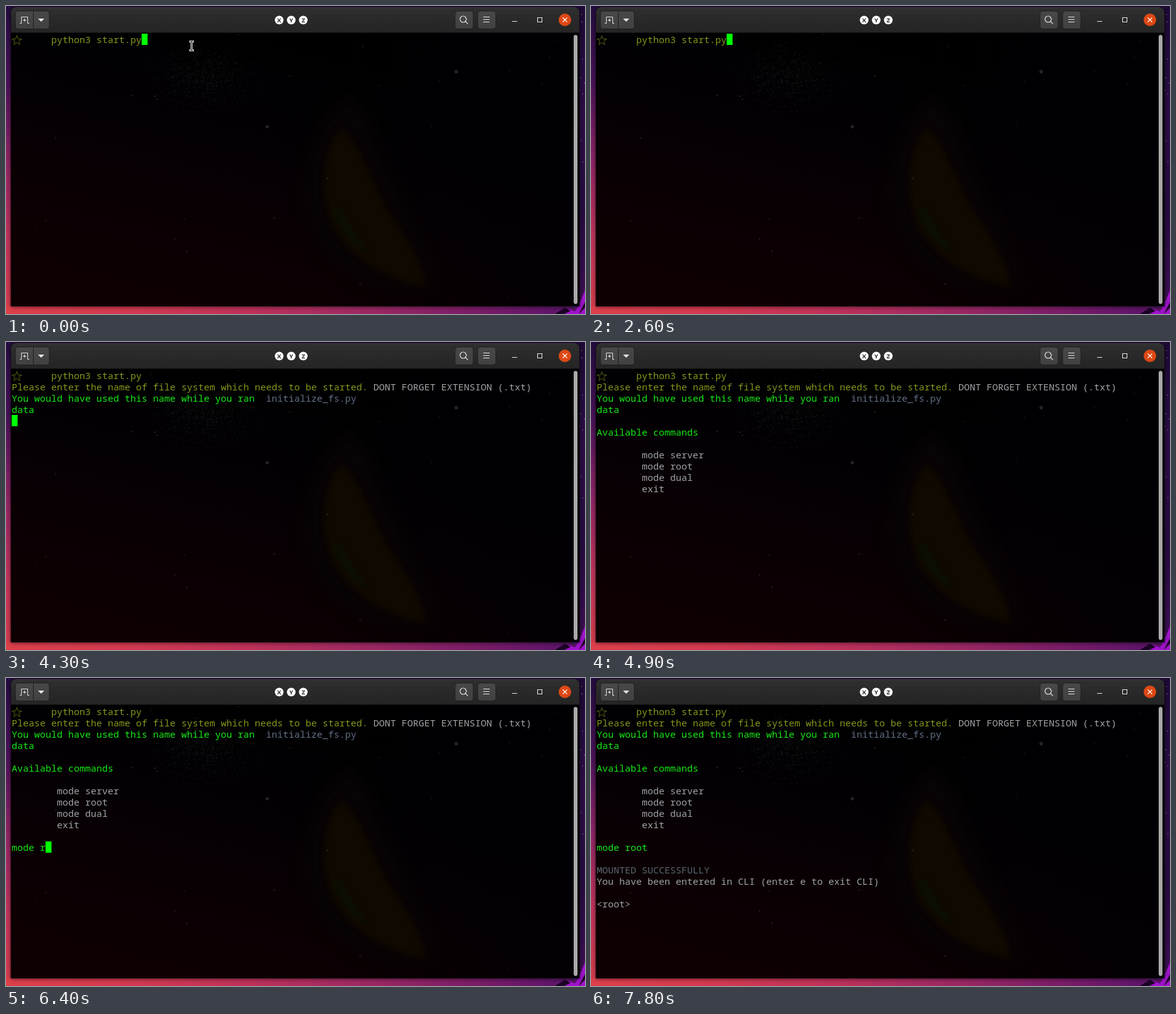
Animation, 922 px wide and 490 px high, one loop 8 s. Source, as an HTML page with a canvas:

```html
<!DOCTYPE html>
<html lang="en">
<head>
<meta charset="utf-8">
<title>Terminal session</title>
<style>
  html, body { margin: 0; width: 100%; height: 100%; overflow: hidden; background: #000; }
  canvas { display: block; }
</style>
</head>
<body>
<canvas id="stage" width="922" height="490"></canvas>
<script>
const W = 922, H = 490, LOOP = 8000, KEY_PACE = 100;
const CELL = 9, ROW = 18, LEFT = 9, TOP = 44;
const OLIVE = '#87961a', GREEN = '#16e816', GREY = '#a0a2a5', SLATE = '#626f86', DIM = '#5a6570';
const FONT = '15px "Noto Sans Mono", "DejaVu Sans Mono", monospace';

const print = (at, colour, text) => ({ at, colour, text });
const type = (at, ...keys) => keys.map((key, i) => print(at + i * KEY_PACE, GREEN, key));

// Everything written to the terminal, in order; the cursor follows the last text.
const SESSION = [
  print(0, OLIVE, '       python3 start.py'),
  print(3000, OLIVE, '\nPlease enter the name of file system which needs to be started. '),
  print(3000, GREY, 'DONT FORGET EXTENSION (.txt)\n'),
  print(3000, GREEN, 'You would have used this name while you ran  '),
  print(3000, SLATE, 'initialize_fs.py\n'),
  ...type(3700, 'da'),
  ...type(3900, 't', 'a'),
  ...type(4300, '\n'),
  print(4500, GREEN, '\nAvailable commands\n\n'),
  ...['mode server', 'mode root', 'mode dual', 'exit\n'].map(name => print(4500, GREY, `        ${name}\n`)),
  ...type(5500, 'm', 'o', 'd'),
  ...type(5900, 'e'),
  ...type(6400, ' r'),
  ...type(6700, 'o', 'o', 't'),
  print(7200, DIM, '\n\nMOUNTED SUCCESSFULLY\n'),
  print(7200, GREY, 'You have been entered in CLI (enter e to exit CLI)\n\n<root> ')
];

// The cursor starts visible and flips at each of these times.
const BLINKS = [400, 1500, 1600, 2200, 3200, 3700, 4900, 5400, 7800];
const POINTER_HIDES = 2600;

const canvas = document.getElementById('stage');
const scene = document.createElement('canvas');
scene.width = W;
scene.height = H;
let c = scene.getContext('2d');

function gradient(x0, y0, x1, y1, colours) {
  const g = c.createLinearGradient(x0, y0, x1, y1);
  colours.forEach((colour, i) => g.addColorStop(i / (colours.length - 1), colour));
  return g;
}

function rect(x, y, w, h, fill) {
  c.fillStyle = fill;
  c.fillRect(x, y, w, h);
}

function rounded(x, y, w, h, r, fill) {
  c.beginPath();
  c.roundRect(x, y, w, h, r);
  c.fillStyle = fill;
  c.fill();
}

function disc(x, y, r, fill) {
  c.beginPath();
  c.arc(x, y, r, 0, Math.PI * 2);
  c.fillStyle = fill;
  c.fill();
}

function shape(path, fill, blur = 0) {
  c.filter = blur ? `blur(${blur}px)` : 'none';
  c.fillStyle = fill;
  c.fill(new Path2D(path));
  c.filter = 'none';
}

function stroke(path, colour, width) {
  c.strokeStyle = colour;
  c.lineWidth = width;
  c.stroke(new Path2D(path));
}

function randomizer(seed) {
  return () => (seed = seed * 16807 % 2147483647) / 2147483647;
}

function drawDesktop() {
  rect(0, 0, W, H, '#200a38');
  rect(0, 0, 9, H, gradient(0, 0, 0, H, ['#250b40', '#4a1259', '#8f2465', '#c0345c', '#d83d4c']));
  rect(912, 0, 10, H, gradient(0, 0, 0, H, ['#1d0935', '#2b0d46', '#260b40', '#400f55']));
  rect(0, 477, W, 13, gradient(0, 0, W, 0, ['#de3f4b', '#d43a50', '#c03258', '#a02a62', '#7c1d66', '#55126a']));
  const random = randomizer(11);
  for (let i = 0; i < 9; i++) disc(914 + random() * 8, random() * 300, 0.8, '#8f6a9c');
  shape('M884 490 L896 482 L906 486 L913 474 L922 452 V490 Z', '#a012cc');
  shape('M874 490 L890 480 L899 485 L889 490 Z M912 490 L922 471 V480 Z', '#1a0424');
}

function drawStars() {
  const random = randomizer(29);
  const scatter = () => random() + random() + random() - 1.5;
  for (let i = 0; i < 1100; i++) {
    rect(312 + scatter() * 70, 112 + scatter() * 50, 1.3, 1.3, `rgba(125,125,125,${0.04 + random() * 0.13})`);
  }
  for (let i = 0; i < 110; i++) {
    disc(8 + random() * 900, 45 + random() ** 1.4 * 430, 0.6 + random() ** 4, 'rgba(120,120,125,0.2)');
  }
  disc(717, 104.5, 3, '#222224');
  disc(416, 192, 2.6, '#262628');
}

function drawWallpaper() {
  c.save();
  c.beginPath();
  c.rect(8, 43, 905, 434);
  c.clip();
  rect(8, 43, 905, 434, gradient(340, 43, 230, 477, ['#000001', '#020003', '#070004', '#0b0003', '#0e0002']));
  rect(500, 43, 413, 434, gradient(500, 0, 913, 0, ['rgba(0,0,3,0)', 'rgba(1,0,5,0.65)']));
  shape('M540 140 C475 200 450 310 505 390 C550 445 635 470 690 446 C672 360 610 270 580 180 Z', '#080304', 10);
  shape('M533 194 C504 230 500 300 520 350 C545 400 610 438 668 446 C664 414 640 372 614 334 C584 290 568 222 533 194 Z', '#100900', 4);
  shape('M517 318 C528 353 548 382 580 394 C562 370 545 345 534 323 Z', '#0b0e01', 3);
  drawStars();
  c.restore();
}

function drawButton(x, w) {
  rounded(x - 0.5, 7.5, w + 1, 29.5, 5, '#1d1d1d');
  rounded(x + 0.5, 8.5, w - 1, 27.5, 4, gradient(0, 8, 0, 36, ['#484848', '#414141']));
}

function drawHeader() {
  rounded(8, 2, 905, 41, [8, 8, 0, 0], gradient(0, 2, 0, 42, ['#303030', '#292929', '#252525']));
  rect(15, 2, 891, 1, '#414141');
  rect(8, 42, 905, 1, '#111');
  drawButton(15, 54);
  rect(43, 9, 1, 27, '#202020');
  drawButton(715, 29);
  drawButton(751, 29);

  const icon = '#e6e6e6';
  stroke('M22 27.5 H24.5 V17.5 H34.5 V27.5 H37 M27 22.5 H32 M29.5 20 V25', icon, 1);
  shape('M51 20 H61 L56 25 Z', icon);
  stroke('M733 21 A5 5 0 1 1 723 21 A5 5 0 1 1 733 21 M731.7 24.7 L735.5 28.5', icon, 1.2);
  stroke('M760 17.5 H770 M760 21.5 H770 M760 25.5 H770', icon, 1.2);
  stroke('M806 24.5 H814 M846.5 18.5 H853.5 V25.5 H846.5 Z', icon, 1.1);
  disc(890, 22, 10, '#dd4814');
  stroke('M886.5 18.5 L893.5 25.5 M893.5 18.5 L886.5 25.5', '#fff', 1.2);

  c.font = 'bold 9.5px "Open Sans", sans-serif';
  c.textAlign = 'center';
  ['X', 'Y', 'Z'].forEach((letter, i) => {
    const x = 435 + i * 19.2;
    disc(x, 22.3, 6.9, '#fff');
    c.fillStyle = '#252525';
    c.fillText(letter, x, 25.7);
  });
}

function drawPromptStar() {
  c.beginPath();
  for (let i = 0; i < 10; i++) {
    const angle = i * Math.PI / 5 - Math.PI / 2, r = i % 2 ? 3.3 : 8;
    c.lineTo(17.3 + r * Math.cos(angle), 55 + r * Math.sin(angle));
  }
  c.closePath();
  c.strokeStyle = '#6c7416';
  c.lineWidth = 0.85;
  c.stroke();
}

function drawPointer() {
  const beam = 'M293.5 56.5 H297.5 M295.5 56.5 V70.5 M293.5 70.5 H297.5';
  c.lineCap = 'square';
  stroke(beam, '#f4f4f4', 3);
  stroke(beam, '#111', 1);
}

function buildScene() {
  drawDesktop();
  c.save();
  c.shadowColor = 'rgba(0,0,0,0.55)';
  c.shadowBlur = 6;
  c.shadowOffsetY = 1;
  rounded(7.5, 2, 906, 476, [8, 8, 0, 0], '#0c0c0c');
  c.restore();
  drawWallpaper();
  drawHeader();
  rounded(904, 46, 6, 428, 3, '#a9a9a9');
  drawPromptStar();
}

function drawSession(t) {
  let row = 0, column = 0;
  c.font = FONT;
  for (const { at, colour, text } of SESSION) {
    if (at > t) break;
    c.fillStyle = colour;
    text.split('\n').forEach((line, i) => {
      if (i) {
        row++;
        column = 0;
      }
      c.fillText(line, LEFT + column * CELL, TOP + row * ROW + 15);
      column += line.length;
    });
  }
  const flips = BLINKS.filter(at => at <= t).length;
  if (flips % 2 === 0) rect(LEFT + column * CELL, TOP + row * ROW, CELL + 0.5, ROW, '#00ff00');
}

function frame() {
  const t = performance.now() % LOOP;
  c.drawImage(scene, 0, 0);
  drawSession(t);
  if (t < POINTER_HIDES) drawPointer();
  requestAnimationFrame(frame);
}

buildScene();
c = canvas.getContext('2d');
frame();
</script>
</body>
</html>
```
